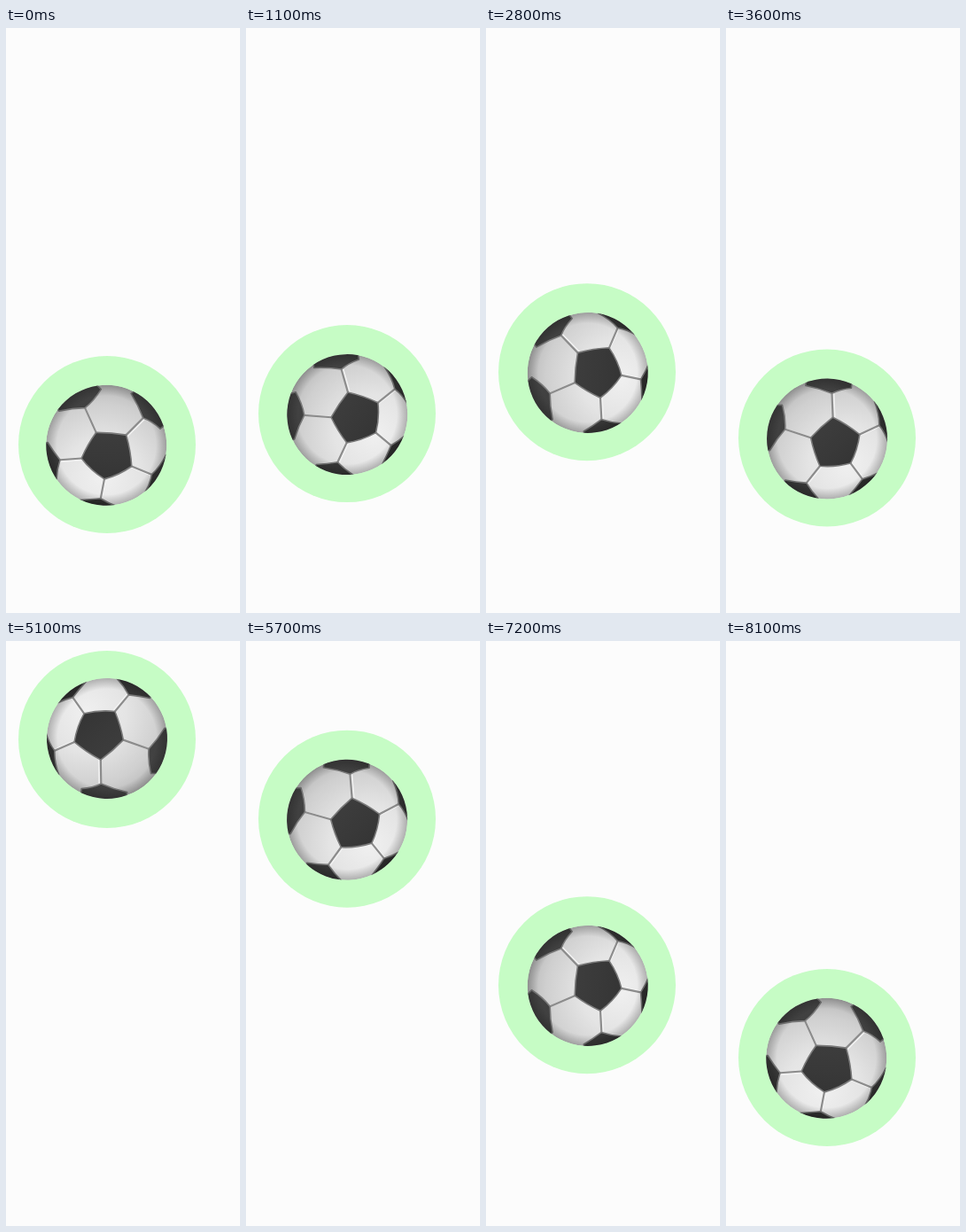
Animation, 264 px wide and 660 px high, one loop 8800 ms. Source, as an HTML page:

```html
<!DOCTYPE html>
<html lang="en">
<head>
<meta charset="utf-8">
<title>Bouncing ball</title>
<style>
  html, body { margin: 0; width: 100%; height: 100%; overflow: hidden; background: #fcfcfc; }
  svg { display: block; width: 264px; height: 660px; }
</style>
</head>
<body>
<svg viewBox="0 0 264 660">
  <defs>
    <radialGradient id="skin" gradientUnits="userSpaceOnUse" cx="-4" cy="38" r="112">
      <stop offset="0" stop-color="#f0f0f0"/>
      <stop offset=".4" stop-color="#e4e4e4"/>
      <stop offset=".75" stop-color="#cfcfcf"/>
      <stop offset="1" stop-color="#b4b4b4"/>
    </radialGradient>
    <radialGradient id="rim" gradientUnits="userSpaceOnUse" cx="-.7" cy=".8" r="68">
      <stop offset=".82" stop-color="#000" stop-opacity="0"/>
      <stop offset="1" stop-color="#000" stop-opacity=".24"/>
    </radialGradient>
    <linearGradient id="dark" gradientUnits="userSpaceOnUse" x1="0" y1="-68" x2="0" y2="68">
      <stop offset="0" stop-color="#444"/>
      <stop offset=".6" stop-color="#393939"/>
      <stop offset="1" stop-color="#303030"/>
    </linearGradient>
    <clipPath id="round"><circle cx="-.7" cy=".8" r="68"/></clipPath>
  </defs>
  <rect width="264" height="660" fill="#fcfcfc"/>
  <g id="disc">
    <circle r="100" fill="#c6fcc5"/>
    <g id="ball">
      <g clip-path="url(#round)" stroke-linejoin="round" stroke-linecap="round">
        <circle cx="-.7" cy=".8" r="68" fill="url(#skin)"/>
        <path id="glow" fill="none" stroke="#f2f2f2" stroke-width="1.6" transform="translate(1.2 1.8)"/>
        <path id="seams" fill="none" stroke="#8c8c8c" stroke-width="2.2"/>
        <path id="patches" fill="url(#dark)" stroke="#7a7a7a" stroke-width="1.6"/>
        <circle cx="-.7" cy=".8" r="68" fill="url(#rim)"/>
      </g>
    </g>
  </g>
</svg>
<script>
  const LOOP = 8800, FALL = 3, STEP = 100, FLOOR = 470, TILT = 3;
  const el = id => document.getElementById(id);

  const seams = 'M-13-13L-27-40M21-12L39-32M29 23L52 31M-1 39L-4 61M-28 17L-52 20';
  el('seams').setAttribute('d', seams);
  el('glow').setAttribute('d', seams);
  el('patches').setAttribute('d', [
    'M-13-13Q4-14 21-12Q27 5 29 23Q15 34-1 39Q-17 30-28 17Q-22 1-13-13Z',
    'M-56-35Q-41-39-27-40Q-17-49-10-62L-30-80L-70-50Z',
    'M24-59Q33-46 39-32Q49-29 59-21L80-40L45-75Z',
    'M67 8Q61 22 52 31Q51 42 45 53L60 70L85 20Z',
    'M-28 64Q-16 63-4 61Q5 66 15 69L5 85L-30 80Z',
    'M-67 1Q-60 11-52 20Q-55 31-55 43L-75 50L-85 5Z'
  ].join(''));

  // Each hop: start s, end s, height, lean towards its start
  const hops = [
    [-.46, .38, 362.3, 0],
    [.38, 1.07, 310, 0],
    [1.065, 1.94, 229.5, .21],
    [1.94, 3, 96, 1.9]
  ];

  // Degrees of spin still to come: [s, deg]
  const spin = [[0, 3823], [.4, 2938], [1.2, 1524], [1.4, 1197], [2.1, 446], [3, -TILT]];

  function height(t) {
    const [a, b, top, lean] = hops.find(h => t < h[1]);
    const x = (t - a) / (b - a);
    return top * 4 * x * (1 - x) * (1 + lean * (.5 - x));
  }

  function slope(i) {
    const a = spin[Math.max(0, i - 1)], b = spin[Math.min(spin.length - 1, i + 1)];
    return (b[1] - a[1]) / (b[0] - a[0]);
  }

  function spinLeft(t) {
    const i = spin.findIndex((p, k) => k && t <= p[0]) - 1;
    const [t0, r0] = spin[i], [t1, r1] = spin[i + 1];
    const d = t1 - t0, x = (t - t0) / d, y = 1 - x;
    return r0 * y * y * (1 + 2 * x) + r1 * x * x * (3 - 2 * x)
      + d * x * y * (slope(i) * y - slope(i + 1) * x);
  }

  function draw(ms) {
    const now = Math.floor(ms % LOOP / STEP) * STEP;
    const t = (now < LOOP / 2 ? now - 700 : now - 5100) / 1000;
    const moving = now >= 800 && t >= 0 && t < FALL;
    const y = FLOOR - (moving ? height(t) : 0);
    const turn = moving ? -spinLeft(t) : TILT;
    el('disc').setAttribute('transform', `translate(114 ${y.toFixed(2)})`);
    el('ball').setAttribute('transform', `rotate(${turn.toFixed(2)})`);
  }

  const start = performance.now();
  function tick() {
    draw(performance.now() - start);
    requestAnimationFrame(tick);
  }
  tick();
</script>
</body>
</html>
```
